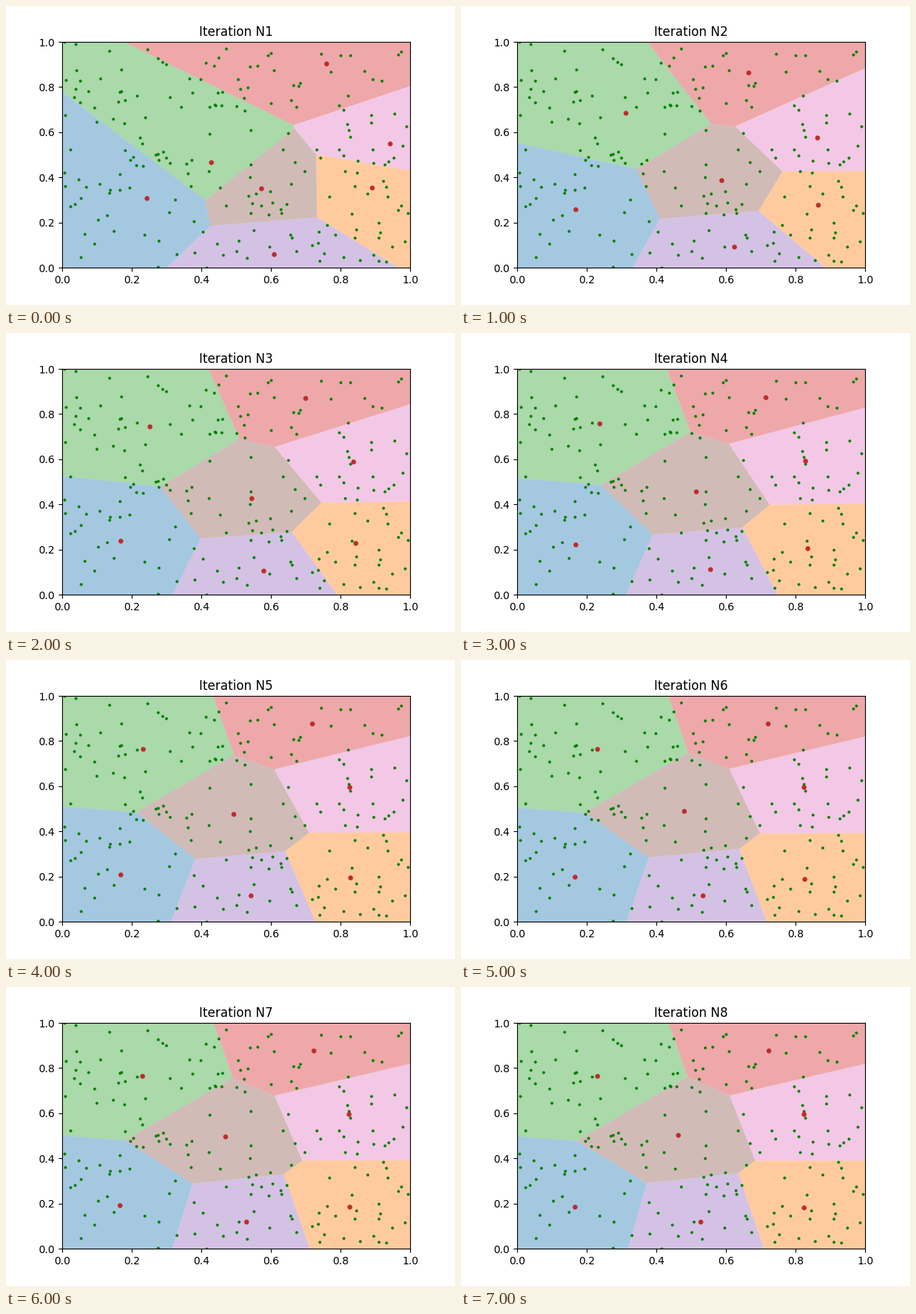
Write a matplotlib script that moves like this. It is 600x400 px and loops after 8 s.

```python
import numpy as np
import matplotlib.pyplot as plt
from matplotlib.animation import FuncAnimation

FRAMES = 8
LEFT, RIGHT, TOP, BOTTOM = 75, 540, 48, 350    # axes box in stage pixels

# Each cluster: colour, first centre, centre after one step, resting centre
# (stage pixels), and the share of the remaining way left after each later step.
CLUSTERS = [
    ("tab:blue", (188, 257), (153, 272), (152, 302), 0.80),
    ("tab:orange", (489, 243), (477, 266), (458, 295), 0.50),
    ("tab:green", (274, 209), (220, 143), (182, 119), 0.27),
    ("tab:red", (428, 77), (384, 89), (411, 85), 0.40),
    ("tab:purple", (358, 332), (365, 322), (319, 314), 0.55),
    ("tab:brown", (341, 244), (348, 233), (284, 194), 0.68),
    ("tab:pink", (513, 184), (476, 176), (458, 170), 0.35),
]


def to_data(x, y):
    return np.array([(x - LEFT) / (RIGHT - LEFT),
                     (BOTTOM - y) / (BOTTOM - TOP)])


def center_at(step, first, second, rest, rate):
    """One jump to the second centre, then an exponential approach to rest."""
    if step == 0:
        return to_data(*first)
    start, end = to_data(*second), to_data(*rest)
    return end + (start - end) * rate ** (step - 1)


def clip(poly, normal, limit):
    """Keep the part of a convex polygon where p . normal <= limit."""
    out = []
    for a, b in zip(poly, poly[1:] + poly[:1]):
        da, db = a @ normal - limit, b @ normal - limit
        if da <= 0:
            out.append(a)
        if da * db < 0:
            out.append(a + (b - a) * da / (da - db))
    return out


def voronoi_cell(centers, i):
    cell = [np.array(p, float) for p in ((0, 0), (1, 0), (1, 1), (0, 1))]
    for j, other in enumerate(centers):
        if j != i:
            normal = other - centers[i]
            cell = clip(cell, normal, normal @ (other + centers[i]) / 2)
    return cell


fig, ax = plt.subplots(figsize=(6, 4), dpi=100)
fig.subplots_adjust(left=0.125, right=0.9, bottom=0.125, top=0.88)
ax.set(xlim=(0, 1), ylim=(0, 1))
title = ax.set_title("")

regions = [ax.fill([0, 1, 1], [0, 0, 1], facecolor=color, alpha=0.4,
                   linewidth=0)[0] for color, *_ in CLUSTERS]
samples = np.random.RandomState(7).rand(200, 2)
ax.scatter(*samples.T, s=8, c="green", linewidths=0, zorder=2)
dots = ax.scatter([], [], s=22, c="#bf2b2b", linewidths=0, zorder=3)


def update(step):
    centers = [center_at(step, *path) for _, *path in CLUSTERS]
    for i, region in enumerate(regions):
        region.set_xy(voronoi_cell(centers, i))
    dots.set_offsets(centers)
    title.set_text(f"Iteration N{step + 1}")
    return [*regions, dots, title]


anim = FuncAnimation(fig, update, frames=FRAMES, interval=1000, repeat=True,
                     repeat_delay=0, blit=False)
plt.show()
```
